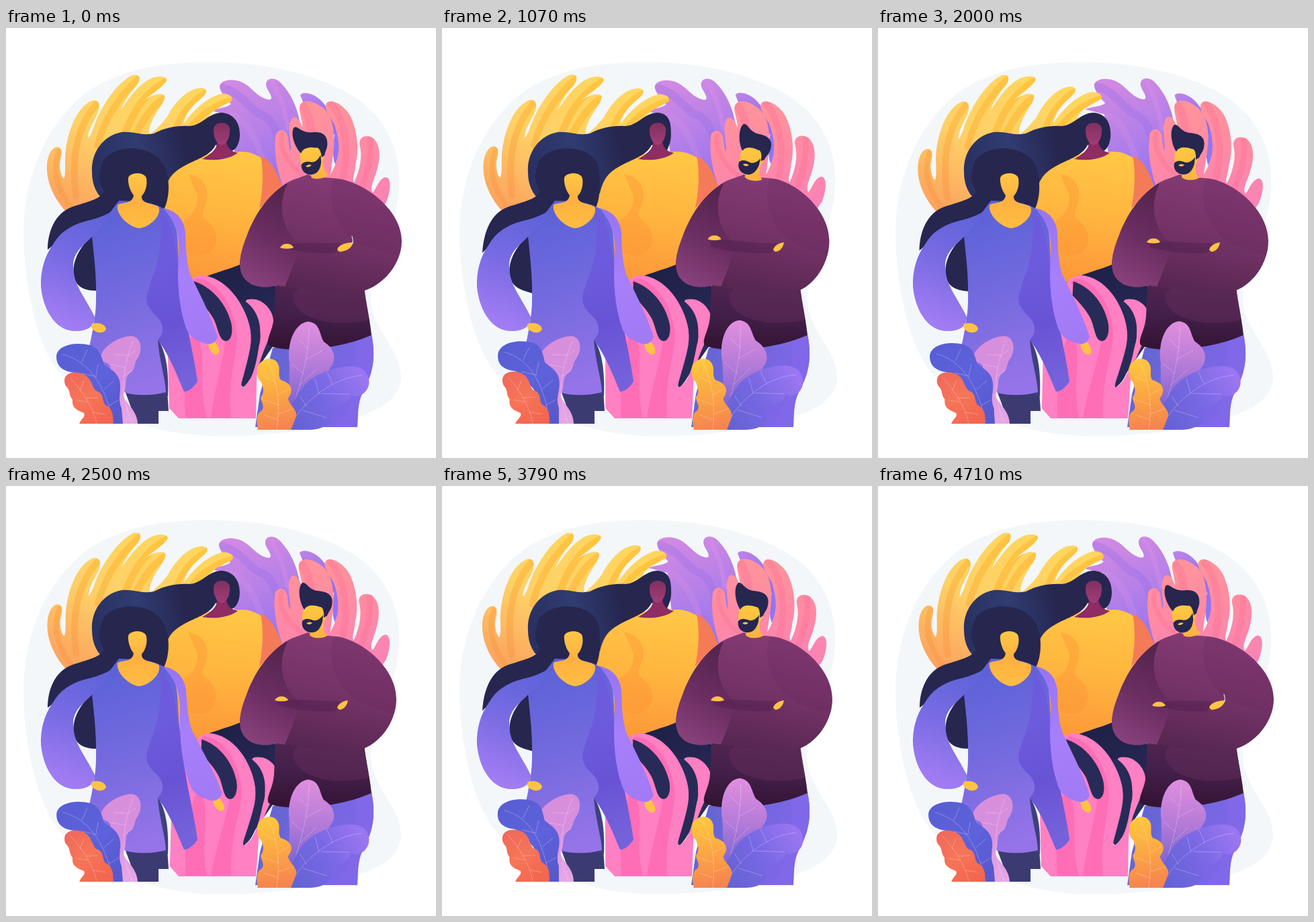
An HTML page with a canvas that plays this animation: 640 by 640 pixels, repeating every 4.78 s.

```html
<!DOCTYPE html>
<html lang="en">
<head>
<meta charset="utf-8">
<title>Three friends</title>
<style>
html, body { margin: 0; width: 100%; height: 100%; overflow: hidden; background: #fff; }
canvas { display: block; width: 640px; height: 640px; }
</style>
</head>
<body>
<canvas id="stage" width="640" height="640"></canvas>
<script>
const ctx = document.getElementById('stage').getContext('2d');
const LOOP = 4780, STEPS = 67;
const NAVY = '#26264f', SKIN = '#ffc344';

function grad(x0, y0, x1, y1, ...colors) {
  const g = ctx.createLinearGradient(x0, y0, x1, y1);
  colors.forEach((c, i) => g.addColorStop(i / (colors.length - 1), c));
  return g;
}
function shape(d, fill) {
  ctx.fillStyle = fill;
  ctx.fill(new Path2D(d));
}
function line(d, color, width) {
  ctx.strokeStyle = color;
  ctx.lineWidth = width;
  ctx.lineCap = ctx.lineJoin = 'round';
  ctx.stroke(new Path2D(d));
}
const veins = d => line(d, 'rgba(255,240,255,.36)', 0.8);

function turned(x, y, angle, draw) {
  ctx.save();
  ctx.translate(x, y);
  ctx.rotate(angle);
  ctx.translate(-x, -y);
  draw();
  ctx.restore();
}
// Lean sideways and stretch upwards while the base line stays put
function leaning(baseY, slope, grow, draw) {
  ctx.save();
  ctx.transform(1, 0, -slope, 1 + grow, slope * baseY, -grow * baseY);
  draw();
  ctx.restore();
}
// Fill a shape and lay shading inside its outline
function shaded(d, fill, draw) {
  shape(d, fill);
  ctx.save();
  ctx.clip(new Path2D(d));
  draw();
  ctx.restore();
}
function keyed(t, keys) {
  const i = keys.findIndex(k => k[0] > t);
  if (i < 0) return keys[keys.length - 1][1];
  if (i === 0) return keys[0][1];
  const [t0, a] = keys[i - 1], [t1, b] = keys[i];
  const u = (t - t0) / (t1 - t0);
  return a + (b - a) * u * u * (3 - 2 * u);
}

function yellowCoral() {
  shaded('M92 276C74 258 62 234 61 212C60 190 68 177 77 177C86 179 82 192 80 202C80 214 83 221 86 224' +
    'C89 219 88 205 88 192C90 158 104 118 128 108C138 106 142 114 136 128C129 142 122 153 122 164' +
    'C127 160 129 150 134 138C147 108 168 80 188 70C201 68 201 76 194 86C184 97 175 110 171 122' +
    'C183 104 197 84 216 75C228 70 240 72 239 78C235 87 215 99 204 109C217 99 232 95 236 101' +
    'C237 110 225 122 218 137C214 147 211 155 214 159C223 151 231 144 240 132C252 109 272 89 291 89' +
    'C301 90 300 97 291 104C278 115 267 127 264 143C279 122 298 104 320 98C332 97 340 103 335 109' +
    'C323 116 307 121 301 134L290 190L150 280Z',
    grad(200, 70, 110, 270, '#ffd65f', '#fed068', '#fca55e'), () => {
      const deep = grad(210, 70, 110, 260, '#ffc540', '#fdbf4c', '#fb9f54');
      line('M79 183C67 212 78 242 98 270', deep, 8);
      line('M136 112C108 143 96 188 104 250', deep, 10);
      line('M199 74C172 98 148 130 136 175', deep, 10);
      line('M239 79C211 94 192 116 176 160', deep, 11);
      line('M237 104C219 114 206 133 192 160', deep, 11);
      line('M298 96C280 105 262 123 252 151', deep, 9);
      line('M337 107C313 112 285 132 272 151', deep, 9);
    });
}
function purpleCoral() {
  shaded('M305 123C315 119 329 119 335 113C326 105 319 95 318 87C319 77 337 74 352 81C366 88 373 102 388 106' +
    'C400 109 394 99 389 91C382 77 395 71 406 79C421 92 434 116 438 144L442 260H390L342 200L334 130Z',
    grad(340, 75, 405, 235, '#d38ae2', '#b680e8', '#9474ef'), () => {
      line('M323 89C352 97 362 121 378 128C400 135 408 163 409 200', 'rgba(143,108,231,.3)', 12);
      line('M396 79C405 98 414 113 420 150', 'rgba(217,145,231,.35)', 7);
      line('M336 130C360 139 370 162 380 190', 'rgba(213,143,229,.25)', 10);
    });
  shape('M438 100C441 94 456 96 468 107C480 119 489 136 494 153L470 180Z', grad(440, 97, 480, 150, '#bd83e9', '#8f70ef'));
  shape('M494 145C500 157 499 183 490 203C484 190 487 158 494 145Z', '#9275f3');
}
function pinkCoral() {
  shaded('M437 240L412 236C402 205 399 185 401 162C402 150 415 149 419 160C421 169 420 177 424 184' +
    'C425 168 418 149 425 135C432 129 438 138 441 148C443 139 434 124 438 114C444 105 460 109 473 120' +
    'C487 133 492 158 486 195L483 218C496 196 500 174 488 142C479 127 471 116 479 110' +
    'C489 106 506 118 513 132C525 158 525 187 520 204C520 215 514 225 518 230' +
    'C525 216 531 194 527 177C523 163 534 158 545 163C558 172 558 194 551 215C547 228 541 239 546 245' +
    'C552 238 555 224 565 222C574 222 573 242 566 259L548 285L440 285Z',
    grad(480, 110, 500, 270, '#ff949a', '#ff8aa4', '#f983b5'), () => {
      const deep = 'rgba(251,112,151,.38)';
      line('M411 159C405 178 422 205 440 218', deep, 7);
      line('M442 116C460 140 452 183 467 207', deep, 12);
      line('M484 113C506 139 510 184 502 222', deep, 10);
      line('M542 166C545 194 536 220 526 247', deep, 9);
    });
}
function sitter() {
  shape('M225 255C235 213 268 188 310 186L350 184C380 184 399 208 411 236L360 360L276 378L255 372L235 280Z',
    grad(320, 190, 300, 375, '#ffc645', '#ffb43f', '#fd9839'));
  shape('M271 218C289 219 303 234 299 256C296 271 286 276 299 287C316 300 318 322 303 334C294 342 280 341 270 332L264 286C278 280 286 267 285 249Z', 'rgba(252,145,54,.4)');
  shape('M379 190C397 198 405 218 411 237L377 268C382 244 384 216 379 190Z', '#f57b58');
  shape('M276 380C304 365 328 361 351 351C374 347 400 373 403 392L400 470L354 536L290 470Z', grad(300, 350, 380, 500, '#1d1f46', '#2a2d5a'));
}
function frontCoral(drift) {
  leaning(581, drift / 180, 0, () => {
    shape('M257 581L243 566L240 450C250 401 269 368 291 368C326 370 356 409 364 449C371 492 346 525 351 535C372 526 374 480 378 467' +
      'C381 449 374 432 360 413C352 405 359 402 372 404C388 408 399 425 398 438C396 461 374 490 373 525L372 581Z', '#ff80c3');
    const deep = 'rgba(253,103,177,.7)';
    shape('M283 373C306 371 337 405 343 450C347 483 329 517 335 580H305C312 525 330 475 326 449C320 414 304 393 276 380Z', deep);
    shape('M285 460C300 489 285 530 299 580H267C264 540 266 490 275 460Z', deep);
    shape('M280 377C305 385 326 408 334 435C339 450 336 466 327 466C317 465 316 447 309 433C302 420 290 408 280 398Z', '#282b57');
    shape('M355 406C373 418 382 440 377 466C374 493 366 526 353 533C348 529 360 500 364 472C367 452 361 428 348 408Z', '#282b57');
  });
}
function sitterHead(w) {
  const r = 348 - w;
  shape(`M128 215C126 185 145 160 172 155C190 153 202 161 220 157C238 148 253 145 273 146C292 145 300 127 320 126C339 127 ${r} 141 ${r} 158C${r} 175 ${r - 8} 182 336 183L312 174C304 191 281 196 264 206C246 216 240 226 235 246L150 260C136 250 128 235 128 215Z`,
    grad(130, 200, 265, 170, '#2a3161', '#303c72', NAVY));
  shape('M314 168C315 181 304 188 292 195C310 198 331 196 345 186C333 183 328 177 328 166Z', '#8e2c63');
  shape('M309 150C310 139 331 137 333 150C334 164 327 174 321 174C314 173 308 163 309 150Z', grad(320, 141, 320, 174, '#80305f', '#a13d77'));
}
function woman(w, k, lift) {
  const r = 242 - w;
  shape(`M129 308C105 330 94 357 104 378C110 388 121 391 135 ${391 + 4 * k}L139 330Z`, NAVY);
  shape(`M142 206C146 179 192 172 218 187C236 198 ${r} 216 ${r} 236C${r} 251 ${r - 3} 263 ${r - 8} 272L175 274L130 300C100 310 78 316 ${62 - 2 * k} ${330 + 5 * k}C62 303 73 275 99 266C124 258 143 254 146 242C137 230 138 216 142 206Z`, NAVY);
  shape('M177 540H240L242 570H227V589H195Z', '#3b3b72');
  shape('M224 460C240 482 242 515 241 548L222 540Z', '#3f407e');

  shape('M168 257C190 258 215 257 235 269C263 286 252 330 260 370C264 430 279 481 285 526C279 536 270 542 265 541C251 507 241 484 226 464C228 495 238 525 238 542C220 547 196 548 178 543L120 500C122 477 134 439 134 405C135 371 131 340 128 310Z',
    grad(145, 275, 230, 520, '#5c62d7', '#756adf', '#9474e8'));
  shape('M228 271C254 294 252 337 260 370C264 430 279 481 285 526C279 536 270 542 265 541C251 507 241 484 226 464C235 455 237 444 225 430C211 417 206 407 211 392C218 369 229 347 230 316C231 299 231 284 228 271Z',
    grad(215, 360, 275, 520, '#6c5bdc', '#6853d5', '#7562da'));
  shape('M171 257C162 275 142 282 117 288C95 294 80 305 70 322C57 340 51 362 52 385C56 426 78 451 102 451C120 452 133 444 132 430C118 400 99 382 100 352C101 330 122 319 130 308C145 292 160 278 171 257Z',
    grad(140, 270, 75, 435, '#5d62d8', '#796be3', '#a17cf3'));
  shape('M127 441C139 436 148 442 149 448C146 456 133 455 127 446Z', SKIN);

  turned(247, 278, -lift * 0.143, () => {
    shape('M301 466C308 464 315 469 317 478C319 485 313 489 308 484C303 481 301 474 301 466Z', SKIN);
    shape('M234 268C254 272 265 285 267 304C268 335 269 357 278 374C291 402 306 430 315 460C312 468 305 472 299 470C283 466 271 459 267 443C255 407 255 364 257 338C259 308 251 287 234 268Z',
      grad(245, 280, 295, 460, '#9975f2', '#a77ffa', '#a27af5'));
  });

  shape('M166 263C175 259 188 262 190 249C184 242 181 229 182 223C185 214 207 214 209 224C211 236 206 246 202 250C201 262 217 260 227 266C233 278 214 297 198 298C182 296 163 277 166 263Z',
    grad(195, 217, 195, 298, '#ffc745', '#ffb041', '#ffbd42'));
}
function manHead() {
  shape('M442 186C444 175 466 174 474 180L478 192L473 203V213C473 219 477 220 478 223C470 228 456 227 452 222L453 216C444 213 439 201 442 186Z', grad(460, 180, 460, 224, '#ffc83f', '#fbb343'));
  shape('M441 201C446 196 452 198 457 200C464 201 468 197 472 192L471 202C468 213 462 219 453 218C444 217 439 209 441 201Z', NAVY);
  shape('M447 204Q452 201 456 204Q451 208 447 204Z', SKIN);
  shape('M444 184C437 174 433 152 441 144C448 143 449 153 463 156C481 157 488 164 485 178C483 186 480 187 478 193L473 196C474 186 471 179 467 180C459 177 448 176 444 184Z', NAVY);
}
function man(right, tilt) {
  const x = right - 581;
  shape('M397 476L544 456C551 491 546 515 531 542C522 560 524 577 523 594H371L378 545Z',
    grad(390, 500, 540, 550, '#6565d3', '#7467df', '#8366e9'));
  shape('M519 460L544 456C551 491 546 515 531 542C523 557 524 578 523 594H490C520 555 525 510 519 460Z', '#8068e9');

  shaded('M402 365L532 370C533 400 541 427 544 457C496 479 414 485 391 472C386 463 398 450 399 428Z',
    grad(470, 375, 465, 475, '#532650', '#43204a', '#341435'), () => {
      shape('M427 397C438 373 501 374 538 388L548 432C507 446 427 441 427 397Z', 'rgba(105,46,91,.42)');
    });
  shaded(`M449 218C462 224 478 222 492 224C${530 + x / 2} 229 ${right} 271 ${right} 317C${right} 356 ${549 + x / 2} 391 522 393C485 397 445 388 402 383C386 388 366 386 356 374C344 361 347 338 358 311C370 277 390 250 412 235C424 225 438 223 449 218Z`,
    grad(475, 220, 435, 390, '#843b73', '#733265', '#552650'), () => {
      shape('M419 232C402 265 412 305 439 324L415 385L340 390V318L395 230Z',
        grad(422, 255, 352, 372, '#56254f', '#6c2e62', '#88417b'));
      shape(`M488 224C476 258 490 304 532 324L${right} 340V220Z`, 'rgba(97,37,89,.18)');
      shape(`M${403 + x} ${319 + x}C438 315 469 322 498 320L490 335C457 337 431 333 ${405 + x} 326Z`, 'rgba(70,28,72,.4)');
    });
  shape(`M${400 + x} ${319 + x}C${404 + x} ${311 + x} ${417 + x} ${312 + x} ${420 + x} ${319 + x}Q${410 + x} ${322 + x} ${400 + x} ${319 + x}Z`, SKIN);
  const reach = Math.max(0, x);
  shape(`M493 330C494 324 502 320 ${509 + reach * 0.9} 319C${508 + reach} 326 ${503 + reach / 2} 333 496 333Z`, SKIN);
  if (reach > 4) line('M515 310Q517 315 516 321', '#fff', 1);
  turned(455, 210, tilt * Math.PI / 180, manHead);
}
function leftLeaves(k) {
  leaning(589, k * 0.045, 0, () => {
    shape('M141 489C145 471 176 456 190 459C203 463 203 483 195 493C190 500 193 509 184 514C175 522 181 533 175 544C173 556 195 566 196 589H174C166 561 165 538 157 525C151 511 160 506 151 499C144 497 141 494 141 489Z',
      grad(190, 460, 170, 580, '#d98fda', '#d58fdf', '#e6a7e5'));
    veins('M189 465C176 500 166 540 188 588M181 487L161 486M177 505L156 501M181 488L193 480M174 519L188 510M171 542L160 529');
  });
  leaning(589, k * 0.085, k * 0.033, () => {
    shape('M75 489C76 471 105 467 125 472C140 477 142 489 146 501C156 508 169 514 170 531C171 544 166 552 172 566L174 589H148C142 558 138 537 121 531C110 528 112 516 102 513C84 511 75 503 75 489Z',
      grad(90, 478, 160, 580, '#585ed4', '#5e62db', '#5759cd'));
    veins('M85 486C121 495 147 528 160 588M113 497L121 479M134 517L137 501M146 538L160 526M135 519L113 514M153 562L167 554');
  });
  leaning(589, k * 0.047, k * 0.015, () => {
    shape('M87 525C87 512 104 510 115 515C128 521 127 533 134 540C147 544 142 554 148 561C160 567 160 579 159 589H109C112 581 119 579 116 573C102 568 98 563 99 553C93 546 96 540 91 535C88 532 87 529 87 525Z',
      grad(95, 515, 145, 585, '#f0695a', '#f67558', '#f3664f'));
    veins('M96 521C113 540 129 562 135 588M110 540L116 525M119 551L137 550M122 557L105 554M130 572L148 575');
  });
}
function rightLeaves(k) {
  leaning(597, -k * 0.047, k * 0.013, () => {
    shape('M421 491C420 458 435 437 451 437C468 440 466 455 473 467C491 478 492 496 482 506C478 520 464 520 458 530L424 584C418 555 424 513 421 491Z',
      grad(445, 440, 440, 565, '#df8ede', '#b47bd8', '#7a64d2'));
    veins('M451 446C451 490 437 535 419 590M449 477L435 463M447 493L471 480M443 515L426 500M438 531L462 508');
    shape('M540 523C543 538 529 552 514 547C510 561 492 562 482 568C489 586 477 597 452 598H373C423 586 428 547 447 529C468 507 536 488 540 523Z',
      grad(410, 580, 530, 515, '#6261d2', '#7667e2', '#9b76f2'));
    veins('M530 517C489 520 445 552 423 592M486 530L478 512M466 545L460 522M469 544L511 545M447 563L438 548M442 569L477 580');
  });
  leaning(597, -k * 0.03, 0, () => {
    shape('M374 511C373 495 393 487 402 496C411 506 403 515 409 524C427 529 428 541 420 551C420 560 434 567 432 578C429 586 427 591 424 598H375C373 590 372 578 377 572C388 566 380 558 379 550C386 541 382 534 380 527C375 523 374 517 374 511Z',
      grad(388, 493, 407, 595, '#ffc83d', '#fba843', '#f68450'));
    veins('M390 497C405 525 408 560 403 598M401 527L383 518M405 546L421 537M406 561L382 553M406 574L426 567M405 583L384 576');
  });
}

function draw(t) {
  const phase = 4 * Math.PI * t / LOOP;
  const sway = Math.sin(phase);
  const k = (1 - Math.cos(phase)) / 2;
  const drift = 5 * (1 - Math.cos(phase / 2));
  const lift = keyed(t, [[2300, 0], [2900, 1], [3200, 1], [3700, 0]]);
  const right = keyed(t, [[0, 589], [600, 576], [1140, 576.5], [1500, 581], [4000, 581], [4680, 589]]);
  const tilt = keyed(t, [[0, -11], [600, 9], [950, 9], [1430, -4], [1750, 0], [4000, 0], [4680, -11]]);

  ctx.fillStyle = '#fff';
  ctx.fillRect(0, 0, 640, 640);
  shape('M300 51C370 50 440 62 500 92C560 122 588 175 585 235C583 300 545 345 543 395C541 450 588 475 588 520C586 560 540 575 500 586C430 604 360 609 300 607C200 603 110 560 70 500C40 450 26 370 26 300C27 220 60 140 125 92C180 58 240 51 300 51Z', '#f3f7fa');
  turned(415, 290, -sway * 0.021, purpleCoral);
  turned(205, 285, sway * 0.025, yellowCoral);
  turned(480, 290, -sway * 0.028, pinkCoral);
  sitter();
  frontCoral(drift);
  sitterHead(7.3 * k);
  woman(7.5 * k, k, lift);
  man(right, tilt);
  leftLeaves(k);
  rightLeaves(k);
}

function tick() {
  const step = Math.floor((performance.now() % LOOP + 3) * STEPS / LOOP) % STEPS;
  draw(step * LOOP / STEPS);
  requestAnimationFrame(tick);
}
tick();
</script>
</body>
</html>
```
